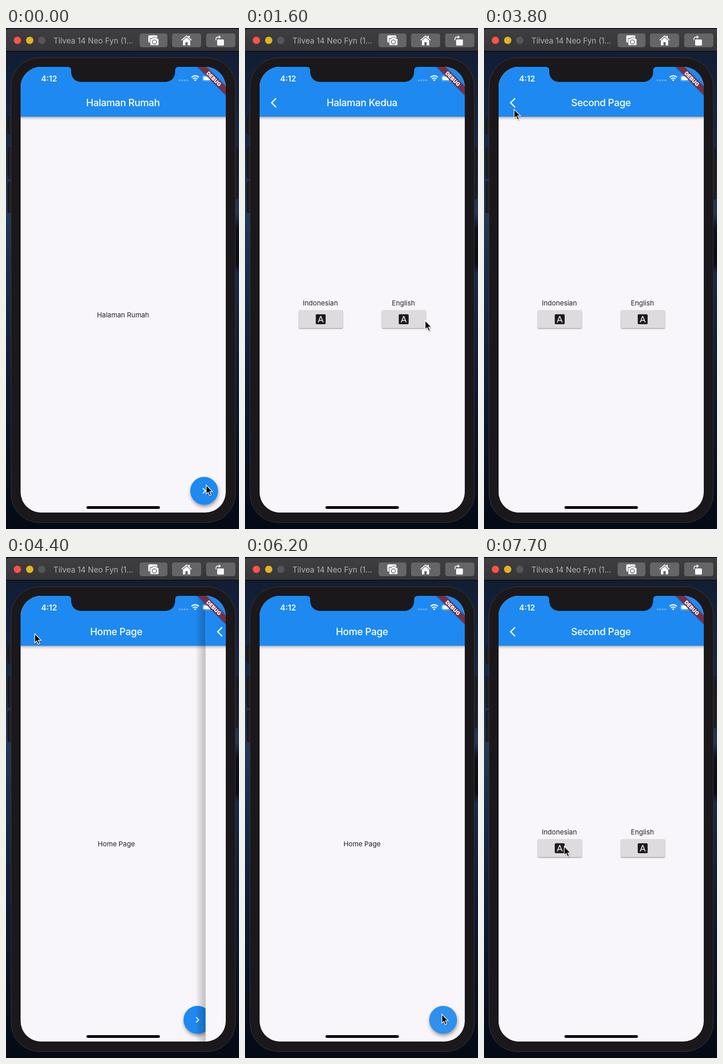
Recreate the animation shown at these times as an HTML page. Size 511x1096 px, loop 8000 ms.

```html
<!DOCTYPE html>
<html lang="id">
<head>
<meta charset="utf-8">
<title>Language switch</title>
<style>
html, body { margin: 0; width: 100%; height: 100%; overflow: hidden; background: #0b1526; }
svg { display: block; width: 100%; height: 100%; }
text { font-family: Inter, Roboto, sans-serif; }
.title { font-size: 21.5px; font-weight: 500; letter-spacing: -.02em; fill: #fff; text-anchor: middle; }
.label { font-size: 14.9px; fill: #232225; text-anchor: middle; }
</style>
</head>
<body>
<svg viewBox="0 0 511 1096" preserveAspectRatio="none">
  <defs>
    <linearGradient id="seaLeft" x2="0" y2="1">
      <stop offset="0" stop-color="#101b30"/><stop offset=".18" stop-color="#15233d"/>
      <stop offset=".38" stop-color="#233857"/><stop offset=".45" stop-color="#1b2f50"/>
      <stop offset=".7" stop-color="#0e1c34"/><stop offset="1" stop-color="#040a15"/>
    </linearGradient>
    <linearGradient id="seaRight" x2="0" y2="1">
      <stop offset="0" stop-color="#101b30"/><stop offset=".25" stop-color="#192944"/>
      <stop offset=".37" stop-color="#253753"/><stop offset=".4" stop-color="#0c111c"/>
      <stop offset=".47" stop-color="#080b13"/><stop offset=".49" stop-color="#182a48"/>
      <stop offset=".7" stop-color="#0e1b32"/><stop offset="1" stop-color="#040a15"/>
    </linearGradient>
    <linearGradient id="bar" x2="0" y2="1">
      <stop offset="0" stop-color="#3f3e40"/><stop offset="1" stop-color="#353436"/>
    </linearGradient>
    <linearGradient id="below" x2="0" y2="1">
      <stop offset="0" stop-opacity=".32"/><stop offset=".4" stop-opacity=".12"/><stop offset="1" stop-opacity="0"/>
    </linearGradient>
    <linearGradient id="edge">
      <stop offset="0" stop-opacity="0"/><stop offset="1" stop-opacity=".24"/>
    </linearGradient>
    <filter id="soft" x="-50%" y="-50%" width="200%" height="200%"><feGaussianBlur stdDeviation="4"/></filter>
    <filter id="tight" x="-20%" y="-30%" width="140%" height="160%"><feGaussianBlur stdDeviation="1.3"/></filter>
    <clipPath id="screen"><rect x="32" y="85" width="450" height="975" rx="45"/></clipPath>
    <g id="page">
      <rect x="32" y="85" width="450" height="975" fill="#f8f6fa"/>
      <rect x="32" y="194" width="450" height="8" fill="url(#below)"/>
      <rect x="32" y="85" width="450" height="109" fill="#1e89f1"/>
    </g>
    <g id="button">
      <rect x="-48" y="-18" width="96.500" height="39" rx="2" opacity=".38" filter="url(#tight)"/>
      <rect x="-48" y="-20" width="96.500" height="39.500" rx="2" fill="#dddbde"/>
    </g>
    <path id="letter" transform="translate(-13 -13) scale(1.087)" fill="#1b1a1c" fill-rule="evenodd"
      d="M9.930 13.500h4.140L12 7.980zM20 2H4c-1.100 0-2 .9-2 2v16c0 1.100.9 2 2 2h16c1.100 0 2-.9 2-2V4c0-1.100-.9-2-2-2zm-4.050 16.500l-1.140-3H9.170l-1.120 3H5.960l5.110-13h1.860l5.110 13z"/>
  </defs>

  <rect width="256" height="1096" fill="url(#seaLeft)"/>
  <rect x="256" width="255" height="1096" fill="url(#seaRight)"/>

  <!-- window bar -->
  <rect width="511" height="3" fill="#0b1427"/>
  <path d="M0 51V7Q0 2 5 2H511V51z" fill="url(#bar)"/>
  <rect y="50" width="511" height="1.500" fill="#0a0a0c"/>
  <circle cx="25" cy="27" r="8" fill="#fd5249"/>
  <circle cx="52" cy="27" r="8" fill="#e1b420"/>
  <circle cx="78.500" cy="27" r="8" fill="#565557"/>
  <text x="104" y="33.500" font-size="17" fill="#b3b2b4">Tilvea 14 Neo Fyn (1...</text>
  <g fill="#656466">
    <rect x="293" y="12" width="61" height="30" rx="5"/>
    <rect x="364" y="12" width="64" height="30" rx="5"/>
    <rect x="439" y="12" width="64" height="30" rx="5"/>
  </g>
  <g fill="#f7f7f7">
    <path d="M315 16h14q3 0 3 3v3h-16v10h-1q-3 0-3-3V19q0-3 3-3z"/>
    <path d="M318 23h3l2-3h6l2 3h2q2 0 2 2v11q0 2-2 2h-15q-2 0-2-2V25q0-2 2-2z" stroke="#656466"/>
    <circle cx="325.500" cy="30.500" r="4.500" fill="none" stroke="#656466" stroke-width="1.500"/>
    <path d="M396 16l4 3.500V17h3v5l4.500 4-1.500 1.500-10-8.700-10 8.700-1.500-1.500z"/>
    <path d="M396 20.500l8 7V38h-5.500v-7h-5v7H388V27.500z"/>
    <rect x="463" y="25" width="15" height="13.500" rx="2"/>
    <path d="M460.500 27v-3q0-4 4-4h3" fill="none" stroke="#f7f7f7" stroke-width="1.800"/>
    <path d="M466.500 16l5 4-5 4z"/>
  </g>

  <!-- phone -->
  <g fill="#1f1f21" stroke="#0b0b0d">
    <rect x="4.500" y="194" width="12" height="38" rx="3"/>
    <rect x="4.500" y="262" width="12" height="67" rx="3"/>
    <rect x="4.500" y="337" width="12" height="67" rx="3"/>
    <rect x="496" y="262" width="12" height="112" rx="3"/>
  </g>
  <rect x="11" y="65" width="492" height="1017" rx="63" fill="#1a181a" stroke="#3c3b3f"/>

  <g clip-path="url(#screen)">
    <g id="home">
      <use href="#page"/>
      <text id="homeTitle" class="title" x="256.500" y="171"></text>
      <text id="homeText" class="label" x="256.700" y="633"></text>
      <circle cx="435.500" cy="1017" r="30" opacity=".42" filter="url(#soft)"/>
      <circle cx="434.500" cy="1012.500" r="30.500" fill="#1e89f1"/>
      <circle id="fabInk" cx="434.500" cy="1012.500" r="30.500" fill="#d0d0d0"/>
      <path transform="translate(421.500 999.500) scale(1.087)" fill="#fff" d="M10 6L8.590 7.410 13.170 12l-4.580 4.590L10 18l6-6z"/>
    </g>
    <g id="second">
      <rect x="9.500" y="85" width="22.500" height="975" fill="url(#edge)"/>
      <use href="#page"/>
      <path transform="translate(56.500 150.500) scale(1.087)" fill="#fff" d="M11.670 3.870L9.900 2.100 0 12l9.900 9.900 1.770-1.770L3.540 12z"/>
      <text id="secondTitle" class="title" x="256.500" y="171"></text>
      <text class="label" x="165.300" y="606.500">Indonesian</text>
      <text class="label" x="347.500" y="606.500">English</text>
      <use href="#button" x="166" y="637"/>
      <use href="#button" x="348.300" y="637"/>
      <rect id="buttonInk" x="300.300" y="617" width="96.500" height="39.500" rx="2"/>
      <use href="#letter" x="166" y="637"/>
      <use href="#letter" x="348" y="637"/>
    </g>

    <!-- status bar -->
    <text x="77" y="116.500" font-size="17.300" font-weight="600" fill="#fff">4:12</text>
    <g fill="#fff" fill-opacity=".35">
      <circle cx="381" cy="114.500" r="2"/><circle cx="386.500" cy="114.500" r="2"/>
      <circle cx="392" cy="114.500" r="2"/><circle cx="397.500" cy="114.500" r="2"/>
    </g>
    <g fill="none" stroke="#fff" stroke-width="2.400">
      <path d="M407 107.800a11.500 11.500 0 0 1 16 0M410 111.400a7.300 7.300 0 0 1 10 0"/>
      <path d="M415 116.500l-2.700-2.800a4 4 0 0 1 5.400 0z" fill="#fff" stroke="none"/>
    </g>
    <rect x="431" y="104" width="24" height="12" rx="3.500" fill="none" stroke="#fff" stroke-opacity=".45"/>
    <rect x="432.800" y="105.800" width="15" height="8.500" rx="2" fill="#fff"/>
    <g transform="translate(482 85) rotate(45)">
      <rect x="-60" y="30.400" width="120" height="13.200" opacity=".5" filter="url(#tight)"/>
      <rect x="-60" y="30.400" width="120" height="13.200" fill="#7b2f43" fill-opacity=".94"/>
      <text x="0" y="41.200" font-size="11.500" font-weight="900" fill="#fff" text-anchor="middle">DEBUG</text>
    </g>
    <rect x="176.500" y="1046" width="161" height="6" rx="3"/>
  </g>
  <path d="M135 84v1q8 0 8 8v2c0 14 9 23 23 23h182c14 0 23-9 23-23v-2q0-8 8-8v-1z" fill="#1a181a"/>

  <g id="cursor">
    <path d="M0 0V19.500L4.400 15.400 7.700 23 11 21.500 7.800 14.300H14z" transform="translate(1 2)" opacity=".4" filter="url(#tight)"/>
    <path d="M0 0V19.500L4.400 15.400 7.700 23 11 21.500 7.800 14.300H14z" stroke="#fff" stroke-width="1.400"/>
  </g>
</svg>
<script>
const LOOP = 8000, STEP = 100, WIDTH = 450, SLIDE = 300;
const el = id => document.getElementById(id);
const clamp = v => Math.min(1, Math.max(0, v));

// time, x, y of the pointer tip
const path = [
  [0, 439, 1000], [600, 439, 1000], [900, 442, 1009], [1000, 440, 985], [1300, 395, 640],
  [1600, 395, 640], [2300, 337.5, 636], [3200, 337.5, 636], [3300, 290, 520], [3400, 152, 274],
  [3500, 152, 274], [3600, 110, 225], [3800, 66, 178], [4000, 63, 168], [4500, 63, 168],
  [4900, 213.5, 307], [5100, 271, 533], [5200, 271, 533], [5400, 283.5, 662], [5600, 283.5, 662],
  [5700, 340, 800], [5800, 422, 968], [5900, 422, 968], [6300, 435, 1011], [6700, 435, 1011],
  [7100, 268, 572], [7200, 268, 572], [7700, 176, 633], [8000, 176, 633]
];

function pointer(t) {
  const i = Math.max(1, path.findIndex(p => p[0] >= t));
  const [t0, x0, y0] = path[i - 1], [t1, x1, y1] = path[i];
  const k = (t - t0) / (t1 - t0);
  return [x0 + (x1 - x0) * k, y0 + (y1 - y0) * k];
}

// cubic-bezier(.35, .91, .33, .97), solved by bisection
function ease(x) {
  if (x <= 0 || x >= 1) return clamp(x);
  const bezier = (s, a, b) => 3 * s * (1 - s) ** 2 * a + 3 * s * s * (1 - s) * b + s ** 3;
  let low = 0, high = 1;
  for (let i = 0; i < 24; i++) {
    const mid = (low + high) / 2;
    if (bezier(mid, .35, .33) < x) low = mid; else high = mid;
  }
  return bezier(low, .91, .97);
}

const slide = (t, start) => ease((t - start) / SLIDE);
const press = (t, start, end) => Math.sin(Math.PI * clamp((t - start) / (end - start)));

function draw(now) {
  const t = Math.floor(now % LOOP / STEP) * STEP;
  const shown = slide(t, 636) - slide(t, 4260) + slide(t, 6433);
  const english = t >= 2800;
  el('home').setAttribute('transform', `translate(${-WIDTH / 3 * shown})`);
  el('second').setAttribute('transform', `translate(${WIDTH * (1 - shown)})`);
  el('second').style.display = shown > 0 ? '' : 'none';
  const home = english ? 'Home Page' : 'Halaman Rumah';
  el('homeTitle').textContent = home;
  el('homeText').textContent = home;
  el('secondTitle').textContent = english ? 'Second Page' : 'Halaman Kedua';
  el('fabInk').setAttribute('opacity', .3 * (press(t, 200, 800) + press(t, 6150, 6600)));
  el('buttonInk').setAttribute('opacity', .14 * press(t, 2600, 3000));
  el('cursor').setAttribute('transform', `translate(${pointer(t)})`);
}

const began = performance.now();
function tick() {
  draw(performance.now() - began);
  requestAnimationFrame(tick);
}
tick();
</script>
</body>
</html>
```
